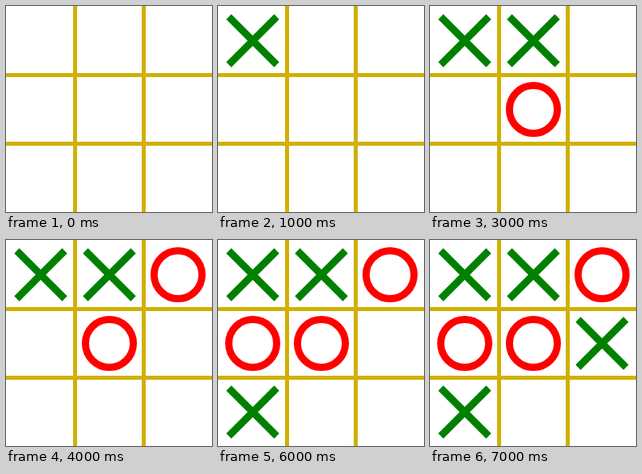
Recreate the animation shown at these times as an HTML page. Size 258 by 258 pixels, loop 8000 ms.

```html
<!DOCTYPE html>
<html lang="en">
<head>
<meta charset="utf-8">
<title>Tic-tac-toe</title>
<style>
  html, body { margin: 0; height: 100%; overflow: hidden; background: #fff; }
  svg { display: block; width: 100%; height: 100%; fill: none; }
</style>
</head>
<body>
<svg viewBox="0 0 258 258">
  <path d="M86.5 0V258M172.5 0V258M0 86.5H258M0 172.5H258" stroke="#d0b000" stroke-width="5"/>
  <g id="marks" stroke-width="9"></g>
</svg>
<script>
  const STEP = 1000;
  // Moves as [column, row]; X starts and the players alternate.
  const moves = [[0, 0], [1, 1], [1, 0], [2, 0], [0, 2], [0, 1], [2, 1]];
  const shapes = [
    { d: 'M-30-30L30 30M30-30L-30 30', stroke: '#008000' },
    { d: 'M-30 0A30 30 0 1 1 30 0A30 30 0 1 1-30 0Z', stroke: '#ff0000' }
  ];

  const marks = moves.map(([col, row], i) => {
    const mark = document.createElementNS('http://www.w3.org/2000/svg', 'path');
    const { d, stroke } = shapes[i % 2];
    mark.setAttribute('d', d);
    mark.setAttribute('stroke', stroke);
    mark.setAttribute('transform', `translate(${43.5 + 86 * col} ${43.5 + 86 * row})`);
    document.getElementById('marks').append(mark);
    return mark;
  });

  const loop = STEP * (moves.length + 1);
  const start = performance.now();

  function draw() {
    const played = Math.floor((performance.now() - start) % loop / STEP);
    marks.forEach((mark, i) => {
      mark.style.display = i < played ? '' : 'none';
    });
    requestAnimationFrame(draw);
  }
  draw();
</script>
</body>
</html>
```
